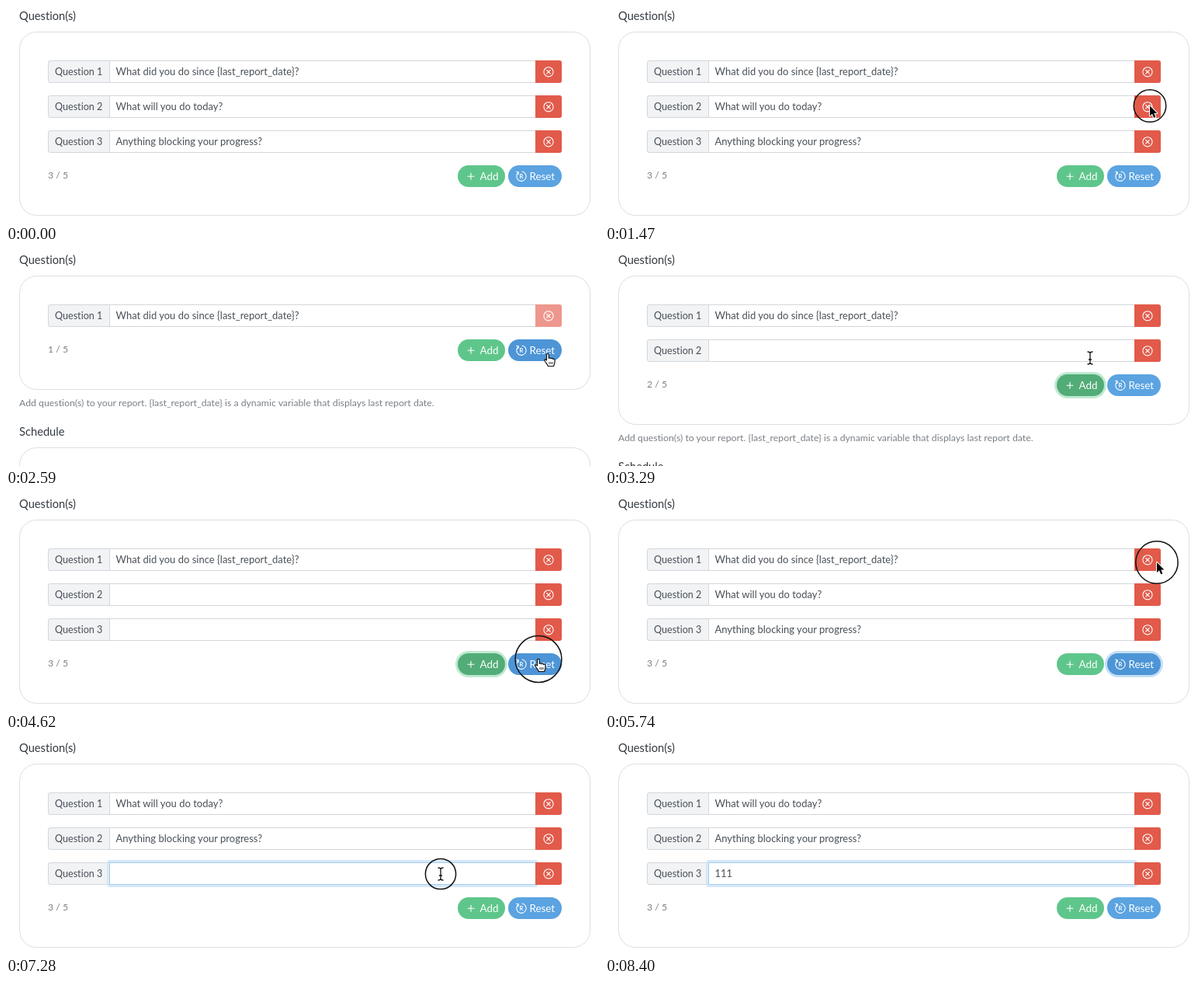
Recreate the animation shown at these times as an HTML page. Size 764x278 px, loop 8540 ms.

```html
<!DOCTYPE html>
<html lang="en">
<head>
<meta charset="utf-8">
<title>Question list</title>
<style>
html, body { margin: 0; width: 100%; height: 100%; overflow: hidden; background: #fff; }
svg { display: block; }
text { font: 13px Lato, "Open Sans", sans-serif; font-variant-ligatures: none; fill: #495057; white-space: pre; }
.head { font-size: 14.7px; fill: #343a40; }
.label { font-size: 12.6px; }
.note { font-size: 12.3px; fill: #7b8086; }
.btn { font-size: 13.4px; fill: #fff; }
.icon { fill: none; stroke: #fff; stroke-width: 1.1; stroke-linecap: round; }
.card { fill: #fff; stroke: #dedede; }
</style>
</head>
<body>
<svg id="stage" width="764" height="278" viewBox="0 0 764 278"></svg>
<script>
const LOOP = 8540, STEP = 70, PITCH = 45;
const SINCE = 'What did you do since {last_report_date}?';
const TODAY = 'What will you do today?';
const BLOCK = 'Anything blocking your progress?';

// start time, row texts, focused control
const states = [
  [0, [SINCE, TODAY, BLOCK]],
  [1890, [SINCE, BLOCK], 'del1'],
  [2450, [SINCE]],
  [3150, [SINCE, ''], 'add'],
  [3850, [SINCE, '', ''], 'add'],
  [4690, [SINCE, TODAY, BLOCK], 'reset'],
  [5880, [TODAY, BLOCK], 'del0'],
  [6720, [TODAY, BLOCK, ''], 'add'],
  [7280, [TODAY, BLOCK, ''], 'input2'],
  [7420, [TODAY, BLOCK, '1'], 'input2'],
  [7560, [TODAY, BLOCK, '11'], 'input2'],
  [7700, [TODAY, BLOCK, '111'], 'input2']
];

// pointer waypoints: time, x, y
const path = [
  [350, 600, 160], [1200, 702, 128.5], [2450, 702, 128.5], [2590, 698, 133.5],
  [2660, 698, 133.5], [2870, 625, 134], [3150, 625, 134], [3290, 625, 139],
  [3480, 624, 176], [3990, 624, 178], [4300, 686, 212.5], [4970, 686, 212.5],
  [5460, 711, 88], [5890, 711, 88], [6230, 624, 179], [6860, 624, 179],
  [7140, 560, 175], [7800, 560, 175], [8330, 600, 300]
];
const clicks = [1330, 2120, 2900, 3500, 4350, 5530, 6300, 7150];

const text = (x, y, s, cls = '') => `<text x="${x}" y="${y}" class="${cls}">${s}</text>`;
const rect = (x, y, w, h, r, attrs) =>
  `<rect x="${x}" y="${y}" width="${w}" height="${h}" rx="${r}" ${attrs}/>`;
const shape = (d, attrs) => `<path d="${d}" ${attrs}/>`;

function pointerAt(t) {
  const i = path.findIndex(p => p[0] > t);
  if (i < 1) return null;
  const [t0, x0, y0] = path[i - 1], [t1, x1, y1] = path[i];
  const u = (t - t0) / (t1 - t0), e = u * u * (3 - 2 * u);
  return { x: x0 + (x1 - x0) * e, y: y0 + (y1 - y0) * e };
}

function hit(p, n) {
  if (!p) return '';
  const top = 70 + PITCH * n;
  if (p.y >= top && p.y <= top + 28) {
    if (p.x >= 582 && p.x <= 643) return 'add';
    if (p.x >= 647 && p.x <= 716) return 'reset';
  }
  const dy = p.y - 70;
  return dy >= 0 && dy < PITCH * n && dy % PITCH < 29 && p.x > 133 && p.x < 682 ? 'input' : '';
}

function row(label, i, n, focus) {
  const del = focus === 'del' + i, input = focus === 'input' + i;
  const red = n === 1 ? '#ee978e' : del ? '#d84e3d' : '#e25a4a';
  return `<g transform="translate(0 ${70 + PITCH * i})">` +
    rect(54.5, .5, 661, 28, 3, 'fill="#fff" stroke="#d3d7db"') +
    shape('M133.5 .5H57.5a3 3 0 0 0-3 3V25.5a3 3 0 0 0 3 3H133.5Z', 'fill="#f1f3f5" stroke="#d3d7db"') +
    (input ? rect(132, -1, 552, 31, 2, 'fill="none" stroke="#d6e8f8" stroke-width="4"') +
      rect(133.5, .5, 549, 28, 0, 'fill="#fff" stroke="#a6cdef"') : '') +
    shape('M682 0H713a3 3 0 0 1 3 3V26a3 3 0 0 1-3 3H682Z',
      `fill="${red}"` + (del ? ' stroke="#f3b9b2" stroke-width="2.5" paint-order="stroke"' : '')) +
    '<g class="icon"><circle cx="699" cy="14.8" r="6.1"/><path d="M696.7 12.5l4.6 4.6m0-4.6l-4.6 4.6"/></g>' +
    text(63, 19.3, 'Question ' + (i + 1), 'label') + text(141.5, 19.3, label) + '</g>';
}

function pill(x, w, fill, glow) {
  return (glow ? rect(x - 3, -3, w + 6, 34, 17, `fill="${glow}"`) : '') + rect(x, 0, w, 28, 14, `fill="${fill}"`);
}

function buttons(n, over, focus) {
  const on = k => over === k || focus === k;
  return `<g transform="translate(0 ${70 + PITCH * n})">` +
    pill(582, 61, on('add') ? '#52ac77' : '#5fc68b', focus === 'add' && '#bfe9d1') +
    pill(647, 69, on('reset') ? '#4d95d6' : '#5ba3e1', focus === 'reset' && '#c4dff5') +
    shape('M595 14.2h8m-4-4v8', 'class="icon"') + text(610.5, 18.8, 'Add', 'btn') +
    shape('M660.2 9.2A6.2 6.2 0 1 0 665 8m-7.4 .2l2.8 .8l-.6 2.8', 'class="icon"') +
    '<text x="661.6" y="17.2" style="font-size:7.5px;font-weight:700;fill:#fff">R</text>' +
    text(674.5, 18.8, 'Reset', 'btn') + '</g>';
}

function cursor(p, over) {
  const at = `transform="translate(${p.x.toFixed(1)} ${p.y.toFixed(1)})" stroke-linejoin="round" `;
  if (over === 'input') {
    const d = 'M-3.5-8Q0-8 0-6Q0-8 3.5-8M0-6V6M-3.5 8Q0 8 0 6Q0 8 3.5 8M-2 2H2';
    return shape(d, at + 'fill="none" stroke="#fff" stroke-width="3"') +
      shape(d, at + 'fill="none" stroke="#111" stroke-width="1.3"');
  }
  if (over) {
    return shape('M-1.5 1C-1.5-.6 1.2-.6 1.3 1V6C1.5 5 4 5 4.1 6.3C4.4 5.4 6.6 5.6 6.7 7C7.2 6.2 9 6.6 9 8.2' +
      'V11C9 13 7.8 14 7.6 16H.3C.2 14-3.7 10.5-4.2 8.6C-4.4 7-2.6 7-1.5 8.5Z', at + 'fill="#fff" stroke="#111" stroke-width="1.2"') +
      shape('M2 10.5v3M4 10.5v3M6 10.5v3', at + 'stroke="#111" stroke-width=".8"');
  }
  return shape('M0 0V13L3 10.2L5.2 15.3L7.4 14.4L5.3 9.4H9.4Z',
    at + 'fill="#000" stroke="#fff" stroke-width="2" paint-order="stroke"');
}

function ring(p, t) {
  const start = clicks.find(c => t > c && t < c + 280);
  if (!start) return '';
  const r = 30 * (1 - (1 - (t - start) / 280) ** 1.7);
  return `<circle cx="${p.x}" cy="${p.y}" r="${r}" fill="none" stroke="#111" stroke-width="1.5"/>`;
}

function scene(t) {
  const [, rows, focus] = states.findLast(s => s[0] <= t);
  const n = rows.length, shift = PITCH * n;
  const p = pointerAt(t), over = hit(p, n);
  return text(17, 18, 'Question(s)', 'head') +
    rect(17.5, 33.5, 735, 101 + shift, 22, 'class="card"') +
    rows.map((label, i) => row(label, i, n, focus)).join('') +
    text(54, 86.6 + shift, n + ' / 5', 'note') +
    buttons(n, over, focus) +
    text(17, 156.3 + shift, 'Add question(s) to your report. {last_report_date} is a dynamic variable that displays last report date.', 'note') +
    text(17, 194 + shift, 'Schedule', 'head') +
    rect(17.5, 209.5 + shift, 735, 200, 22, 'class="card"') +
    (p ? cursor(p, over) + ring(p, t) : '');
}

const stage = document.getElementById('stage');
const begin = performance.now();
let shown = -1;
function tick() {
  const ms = (performance.now() - begin) % LOOP;
  const t = Math.floor(ms / STEP) * STEP;
  if (t !== shown) stage.innerHTML = scene(shown = t);
  requestAnimationFrame(tick);
}
tick();
</script>
</body>
</html>
```
